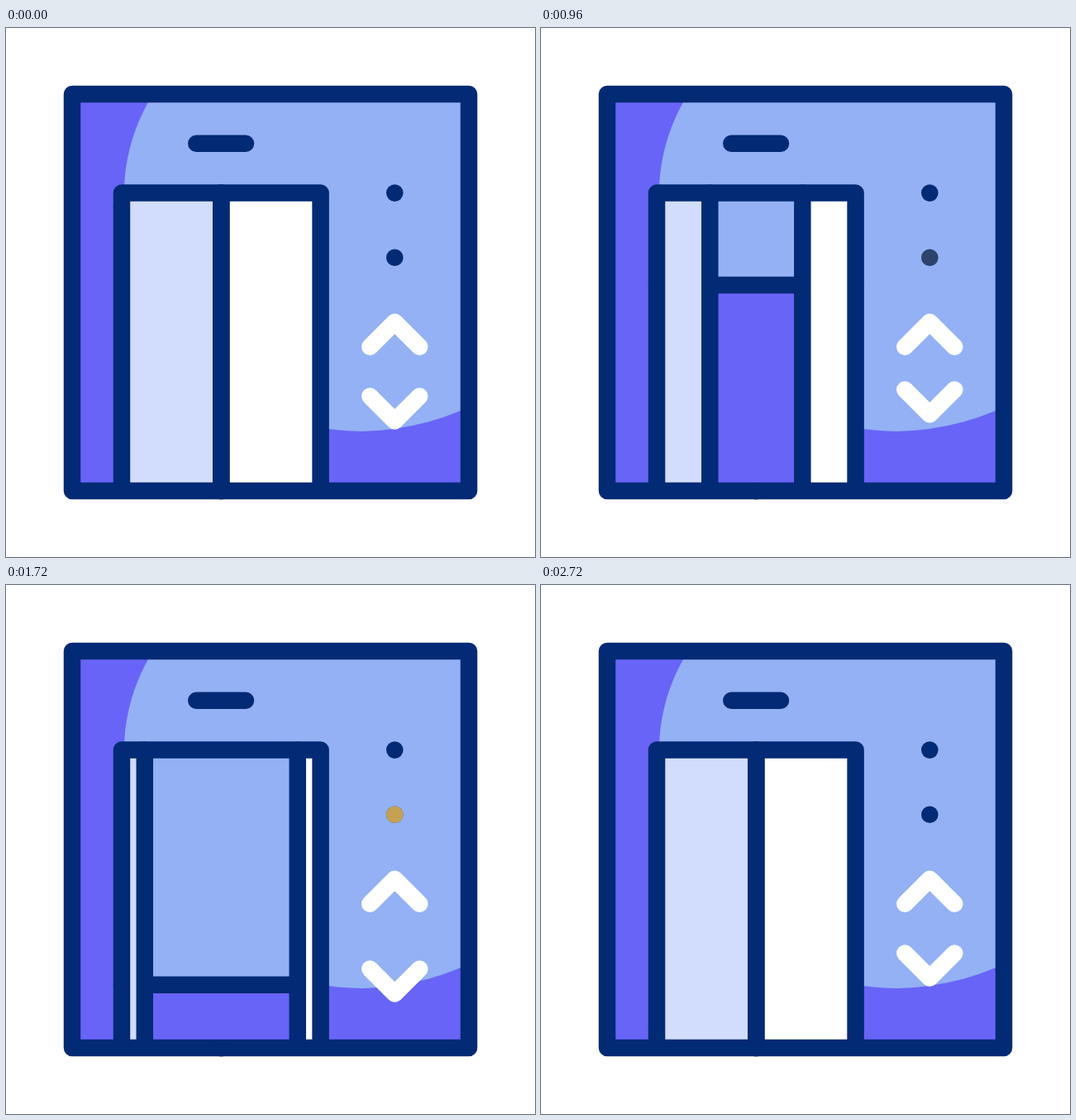
An HTML page for the animation above (3 s loop, 640x640 px).

```html
<!DOCTYPE html>
<html lang="en">
<head>
<meta charset="utf-8">
<title>Elevator</title>
<style>
  html, body { margin: 0; width: 100%; height: 100%; overflow: hidden; background: #fff; }
  svg { display: block; width: 100%; height: 100%; }
  .line { fill: none; stroke: #032a74; stroke-width: 20.5; stroke-linecap: round; stroke-linejoin: round; }
  .white { stroke: #fff; }
  .navy { fill: #032a74; }
  .purple { fill: #6864f7; }
  .blue { fill: #93b1f4; }
</style>
</head>
<body>
<svg viewBox="0 0 640 640">
  <rect class="purple" x="80" y="80" width="480" height="480"/>
  <path class="blue" d="M172 90C154 122 143 160 143 200A288 288 0 0 0 431 488Q493 487 550 463L560 458V80H177Z"/>

  <rect class="blue" x="140" y="200" width="240" height="360"/>
  <g id="floor">
    <rect class="purple" x="140" width="240" height="360"/>
    <path class="line" d="M140 0H380"/>
  </g>
  <rect id="leftPanel" x="140" y="200" height="360" fill="#d2dcfd"/>
  <rect id="rightPanel" y="200" height="360" fill="#fff"/>
  <path id="leftEdge" class="line" d="M260.3 199.6V560.3"/>
  <path id="rightEdge" class="line" d="M260.3 199.6V560.3"/>
  <path class="line" d="M140 560V199.6H380.6V560"/>

  <!-- hides the floor below the frame -->
  <rect x="60" y="570" width="520" height="70" fill="#fff"/>
  <rect class="line" x="80" y="80" width="480" height="480"/>
  <path class="line" d="M260.3 560.3h0M230.3 139.7H290"/>

  <circle class="navy" cx="470.3" cy="199.6" r="10.3"/>
  <circle class="navy" cx="470.3" cy="277.7" r="10.3"/>
  <circle id="lamp" cx="470.3" cy="277.7" r="10.3" fill="#fac348"/>
  <path class="line white" d="M440.3 385.8L470.3 355.8L500.3 385.8"/>
  <path id="arrow" class="line white" d="M440.3 445.6L470.3 475.6L500.3 445.6"/>
</svg>
<script>
  const LOOP = 3000, STEP = 40, CENTER = 260.3;
  const el = id => document.getElementById(id);
  const move = (id, x, y) => el(id).setAttribute('transform', `translate(${x} ${y})`);

  // Eased keyframes: [time, value] pairs
  const tracks = {
    doors: [[481, 0], [1320, 92.5], [2171, 92.5], [2704, 0]],
    floor: [[255, 217], [2205, 532.7]],
    arrow: [[150, 0], [350, 10], [860, -10], [1540, 23], [2220, 0]],
    lamp: [[150, 0], [350, 0.7], [860, 0.12], [1540, 0.95], [2220, 0]]
  };

  function valueAt(keys, t) {
    if (t <= keys[0][0]) return keys[0][1];
    for (let i = 1; i < keys.length; i++) {
      const [t0, v0] = keys[i - 1], [t1, v1] = keys[i];
      if (t < t1) {
        const u = (t - t0) / (t1 - t0);
        return v0 + (v1 - v0) * u * u * (3 - 2 * u);
      }
    }
    return keys[keys.length - 1][1];
  }

  function draw(now) {
    const t = Math.floor((now % LOOP) / STEP) * STEP;
    const gap = valueAt(tracks.doors, t);
    const panel = 120.3 - gap;
    el('leftPanel').setAttribute('width', panel);
    el('rightPanel').setAttribute('x', CENTER + gap);
    el('rightPanel').setAttribute('width', panel);
    move('leftEdge', -gap, 0);
    move('rightEdge', gap, 0);
    move('floor', 0, valueAt(tracks.floor, t));
    move('arrow', 0, valueAt(tracks.arrow, t));
    el('lamp').setAttribute('opacity', valueAt(tracks.lamp, t));
  }

  const start = performance.now();
  function tick() {
    draw(performance.now() - start);
    requestAnimationFrame(tick);
  }
  tick();
</script>
</body>
</html>
```
